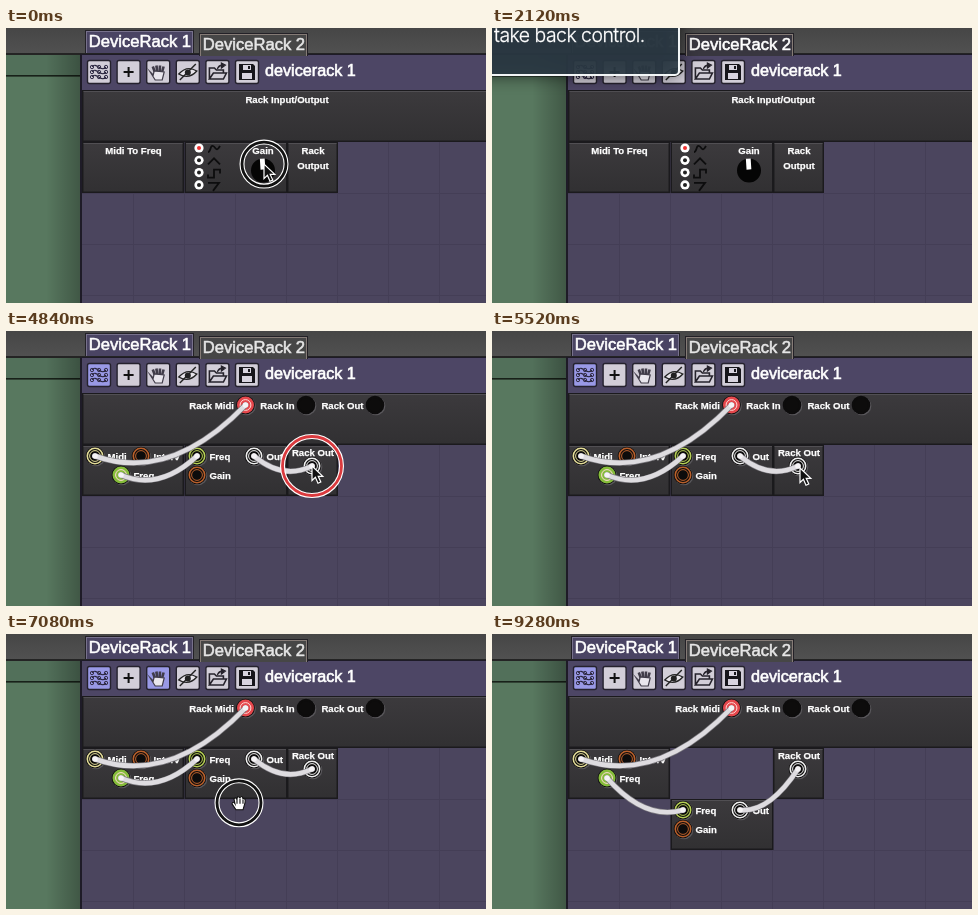
An HTML page with a canvas that plays this animation: 480 by 275 pixels, repeating every 9320 ms.

```html
<!DOCTYPE html>
<html lang="en">
<head>
<meta charset="utf-8">
<title>Device rack</title>
<style>
html, body { margin: 0; width: 100%; height: 100%; overflow: hidden; background: #4a4a4a; }
canvas { display: block; width: 480px; height: 275px; }
</style>
</head>
<body>
<canvas id="stage" width="480" height="275"></canvas>
<script>
const g = document.getElementById('stage').getContext('2d');
const LOOP = 9320, STEP = 40, CELL = 51;
const SANS = '"Liberation Sans", Arial, sans-serif';
const LEFT = 76, TOP = 114;

const iconX = i => 93 + i * 29.6;
const spot = (x, y) => ({ x, y });
const wireButton = spot(iconX(0), 44), handButton = spot(iconX(2), 44);
const offstage = spot(150, -25), outJack = spot(306, 135);

// Each move runs from one time to another; a drag is pressed all the way, a click on arrival.
const moves = [
  { from: -400, to: 120, goal: spot(258, 135), press: 'drag' },
  { from: 280, to: 480, goal: spot(262, 121) },
  { from: 840, to: 960, goal: spot(258, 125), press: 'drag' },
  { from: 1120, to: 1800, goal: offstage },
  { from: 2240, to: 2400, goal: wireButton, press: 'click' },
  { from: 2560, to: 3000, goal: spot(253, 143) },
  { from: 3040, to: 3200, goal: spot(233.5, 141) },
  { from: 3400, to: 3600, goal: spot(300, 131) },
  { from: 3800, to: 3920, goal: spot(114, 134) },
  { from: 3920, to: 4000, goal: spot(244, 123) },
  { from: 4240, to: 4320, goal: spot(300, 127) },
  { from: 4560, to: 4840, goal: outJack, press: 'click' },
  { from: 5200, to: 5520, goal: spot(308, 137) },
  { from: 5680, to: 6120, goal: handButton, press: 'click' },
  { from: 6280, to: 6640, goal: spot(236, 150) },
  { from: 6880, to: 7360, goal: spot(228, 200), press: 'drag' },
  { from: 7640, to: 8080, goal: handButton, press: 'click' },
  { from: 8240, to: 9240, goal: spot(235, 186) }
];
const presses = moves.filter(m => m.press).map(m => m.press === 'drag'
  ? { down: m.from - 160, up: m.to + 80 }
  : { down: m.to, up: m.to + 120 });

const clamp = u => Math.min(1, Math.max(0, u));
const ease = u => u * u * (3 - 2 * u);

function cursorAt(t) {
  let { x, y } = spot(258, 143);
  for (const { from, to, goal } of moves) {
    const e = ease(clamp((t - from) / (to - from)));
    x += (goal.x - x) * e;
    y += (goal.y - y) * e;
  }
  return { x, y };
}

function rect(x, y, w, h, fill) {
  g.fillStyle = fill;
  g.fillRect(x, y, w, h);
}

function fade(x1, y1, x2, y2, a, b) {
  const fill = g.createLinearGradient(x1, y1, x2, y2);
  fill.addColorStop(0, a);
  fill.addColorStop(1, b);
  return fill;
}

function circle(x, y, r, fill, stroke, width = 1) {
  g.beginPath();
  g.arc(x, y, r, 0, Math.PI * 2);
  if (fill) { g.fillStyle = fill; g.fill(); }
  if (stroke) { g.strokeStyle = stroke; g.lineWidth = width; g.stroke(); }
}

function shape(d, fill, stroke, width = 1) {
  const p = new Path2D(d);
  if (fill) { g.fillStyle = fill; g.fill(p); }
  if (stroke) { g.strokeStyle = stroke; g.lineWidth = width; g.stroke(p); }
}

function at(x, y, draw) {
  g.save();
  g.translate(x, y);
  draw();
  g.restore();
}

function text(s, x, y, font, color, weight, align = 'left') {
  g.font = `${font} ${SANS}`;
  g.textAlign = align;
  g.fillStyle = g.strokeStyle = color;
  g.lineWidth = weight;
  g.fillText(s, x, y);
  g.strokeText(s, x, y);
}
const label = (s, x, y, align) => text(s, x, y, 'bold 9.6px', '#fff', 0.25, align);

function panel(x, y, w, h) {
  rect(x, y, w, h, '#1b1a1d');
  rect(x + 1.5, y + 1, w - 3, h - 2.5, fade(0, y, 0, y + h, '#3c3a3d', '#313032'));
  rect(x + 1.5, y + 1, w - 3, 1, '#514f53');
}

function tab(name, x, y, fill, edge, color) {
  rect(x, y, 109, 23, '#232127');
  rect(x + 1, y + 1, 107, 22, edge);
  rect(x + 2, y + 2, 105, 21, fill);
  text(name, x + 3.7, y + 17, '16.6px', color, 0.6);
}

const glyphs = [
  () => {
    for (const y of [-5, 0, 5]) {
      shape(`M-7 ${y}C-3 ${y - 6} 2 ${y + 6} 7 ${y}`, null, '#28243c', 1.2);
      for (const x of [-7, 0, 7]) circle(x, y, 1.7, null, '#37324d', 1);
    }
  },
  () => shape('M-5 0H5M0 -5V5', null, '#111', 2),
  () => {
    for (let i = 0; i < 4; i++) shape(`M${i * 2.2 - 3} 1L${i * 3.6 - 5.4} ${-7 + Math.abs(i - 1.5)}`, null, '#403c49', 2.6);
    shape('M-8 0L-3 8H4L6 0L-4 -1L-5 3Z', '#e9e6ed', '#403c49', 1.2);
  },
  () => {
    shape('M-9 2Q-1 -7 9 -1Q1 8 -9 2Z', '#e8e5eb', '#222', 1.4);
    circle(0, 0.5, 3, '#222');
    shape('M-8 8L8 -8', null, '#222', 1.4);
  },
  () => {
    shape('M-8 7V-4H-3L-1 -2H6V1M-8 7L-4 1H9L6 7Z', null, '#26232c', 1.6);
    shape('M0 -3Q1 -7 5 -7M4 -9L8 -7L4 -4Z', '#26232c', '#26232c', 1.2);
  },
  () => {
    shape('M-8 -8H6L8 -6V8H-8Z', '#17161b');
    rect(-4, -7, 8, 5, '#d8d4df');
    rect(1, -6, 2, 3, '#17161b');
    rect(-5, 1, 10, 6, '#d8d4df');
  }
];

function toolbar(isActive) {
  glyphs.forEach((draw, i) => at(iconX(i), 44, () => {
    g.beginPath();
    g.roundRect(-11.5, -11.5, 23, 23, 2);
    g.fillStyle = isActive[i] ? '#9999e6' : '#d2ced8';
    g.fill();
    g.strokeStyle = '#25222d';
    g.lineWidth = 1.4;
    g.stroke();
    draw();
  }));
  text('devicerack 1', 259, 48, '16.2px', '#fff', 0.65);
}

function backdrop(hot) {
  rect(0, 0, 480, 26, fade(0, 0, 0, 26, '#464646', '#515151'));
  rect(0, 25, 480, 2, '#242424');
  rect(0, 27, 76, 248, '#58785f');
  rect(0, 27, 76, 20, '#52705a');
  rect(0, 47, 75, 1.6, '#182119');
  rect(40, 27, 35, 248, fade(40, 0, 75, 0, 'rgba(0,0,0,0)', 'rgba(0,0,0,.28)'));
  rect(74, 26, 406, 249, '#1e1b27');
  rect(LEFT, 27, 404, 248, '#4b455e');
  rect(LEFT, 27, 404, 35, '#4d4665');
  for (let x = LEFT + CELL; x < 480; x += CELL) rect(x, TOP, 1, 161, '#443e56');
  for (let y = TOP + CELL; y < 275; y += CELL) rect(LEFT, y, 404, 1, '#443e56');
  tab('DeviceRack 1', 79, 2, hot ? '#45434a' : '#4a4463', '#77718c', hot ? '#aaa' : '#fff');
  tab('DeviceRack 2', 193, 5, hot ? '#38363f' : '#464646', '#857b76', hot ? '#fff' : '#e6e6e6');
  panel(LEFT, 62, 406, 52);
}

function modules(dy = 0) {
  panel(LEFT, TOP, 2 * CELL, CELL);
  panel(LEFT + 4 * CELL + 1, TOP, CELL, CELL);
  panel(LEFT + 2 * CELL + 0.5, TOP + dy, 2 * CELL + 1, CELL);
}

function front() {
  modules();
  label('Rack Input/Output', 281, 75, 'center');
  label('Midi To Freq', 127.5, 126, 'center');
  label('Gain', 257, 126, 'center');
  label('Rack', 307, 126, 'center');
  label('Output', 307, 140.5, 'center');
  ['M0 3C3 3 2 -4 5 -3S8 4 12 -3', 'M0 3L6 -3L12 3', 'M0 1V4H6V-4H12V0', 'M0 -3H11L5 5'].forEach((d, i) => {
    const y = 120 + i * 12.3;
    circle(193, y, 4.6, '#fff');
    circle(193, y, 2, i ? '#222' : '#e33');
    at(202, y + 1, () => shape(d, null, '#0d0d0e', 1.8));
  });
  circle(257, 142.5, 12, '#050505');
  at(257, 142.5, () => {
    g.rotate(-0.06);
    rect(-2.4, -12, 4.8, 11, '#fff');
  });
}

function jack(x, y, color, name, before) {
  if (name) label(name, x + (before ? -11.5 : 12.5), y + 3.5, before ? 'right' : 'left');
  circle(x + 1, y + 1, 9.3, '#5a585c');
  circle(x, y, 9.3, '#0e0d0e');
  const filled = color === '#e5484d' || color === '#86bd3b';
  circle(x, y, 7.7, filled ? color : '#0d0c0c', color, 1.6);
  if (color !== '#0d0c0c') circle(x, y, 5.4, null, filled ? '#ffd9d5' : color, 1);
}

function wire(x1, y1, x2, y2) {
  const sag = Math.hypot(x2 - x1, y2 - y1) * 0.33;
  g.lineCap = 'round';
  for (const [color, width] of [['#7d7b80', 5.8], ['#dedce0', 4.6]]) {
    g.beginPath();
    g.moveTo(x1, y1);
    g.quadraticCurveTo((x1 + x2) / 2, (y1 + y2) / 2 + sag, x2, y2);
    g.strokeStyle = color;
    g.lineWidth = width;
    g.stroke();
  }
  g.lineCap = 'butt';
  circle(x1, y1, 2.8, '#f5f3f5');
  circle(x2, y2, 2.8, '#f5f3f5');
}

function back(dy) {
  const upper = 125, lower = 144, black = '#0d0c0c', white = '#eee', rust = '#b9602c', green = '#86bd3b';
  modules(dy);
  jack(239.5, 74, '#e5484d', 'Rack Midi', true);
  jack(300, 74, black, 'Rack In', true);
  jack(369, 74, black, 'Rack Out', true);
  jack(89, upper, '#e3dc98', 'Midi');
  jack(135, upper, rust, 'Interv');
  jack(115, lower, green, 'Freq');
  jack(191, upper + dy, '#b5cf55', 'Freq');
  jack(191, lower + dy, rust, 'Gain');
  jack(248, upper + dy, white, 'Out');
  jack(outJack.x, outJack.y, white);
  label('Rack Out', 307, 125, 'center');
  wire(239.5, 74, 89, upper);
  wire(115, lower, 191, upper + dy);
  wire(248, upper + dy, outJack.x, outJack.y);
}

function ring(t, x, y) {
  for (const { down, up } of presses) {
    if (t < down || t >= up + 80) continue;
    const k = clamp((t - down - 40) / 120), mix = (a, b) => a + (b - a) * k;
    const r = mix(29.5, 22);
    g.globalAlpha = 1 - clamp((t - up) / 80);
    circle(x, y, r, null, '#fff', 5);
    circle(x, y, r, null, `rgb(${mix(218, 18)},${mix(58, 18)},${mix(62, 18)})`, 2.8);
    g.globalAlpha = 1;
  }
}

function cursor(x, y, hand) {
  at(x, y, () => hand
    ? shape('M-3 7L-7 1Q-6 -2 -4 1L-5 -4Q-3 -6 -2 -3Q-2 -8 1 -5Q3 -8 4 -4Q7 -5 6 0L4 7ZM-2 -3V1M1 -4V1M4 -3V1', '#fff', '#111', 1.1)
    : shape('M0 0V14.5L3.4 11.3L6 17.2L8.8 16L6.2 10.3H10.8Z', '#111', '#fff', 1.2));
}

// The caption swoops in from the top-left corner and back out on a parabola.
function banner(t) {
  const retreat = ((t - 1720) / 400) ** 2;
  if (retreat > 2.6) return;
  const right = 310 - 122 * retreat, bottom = 125 - 77 * retreat;
  g.save();
  g.beginPath();
  g.roundRect(-200, -200, right + 199, bottom + 199, 4);
  g.shadowColor = 'rgba(0,0,0,.75)';
  g.shadowBlur = 18;
  g.fillStyle = 'rgba(44,58,69,.9)';
  g.fill();
  g.shadowColor = 'transparent';
  g.strokeStyle = '#f2f5f6';
  g.lineWidth = 2;
  g.stroke();
  g.font = '300 19.4px Inter, "Open Sans", sans-serif';
  g.letterSpacing = '-0.5px';
  g.textAlign = 'left';
  g.fillStyle = g.strokeStyle = '#fff';
  g.lineWidth = 0.3;
  g.fillText('take back control.', right - 186, bottom - 34);
  g.strokeText('take back control.', right - 186, bottom - 34);
  g.restore();
}

function render(t) {
  const wired = t >= 2440, hand = t >= 6200 && t < 8120;
  const { x, y } = cursorAt(t);
  backdrop(t >= 1800 && t < 2280);
  toolbar({ 0: wired, 2: hand });
  if (wired) back(t >= 7120 ? CELL : 0);
  else front();
  ring(t, x, y);
  if (t < 9260) cursor(x, y, hand);
  banner(t);
}

const start = performance.now();
function tick() {
  const t = (performance.now() - start) % LOOP;
  render(Math.floor(t / STEP) * STEP);
  requestAnimationFrame(tick);
}
tick();
</script>
</body>
</html>
```
